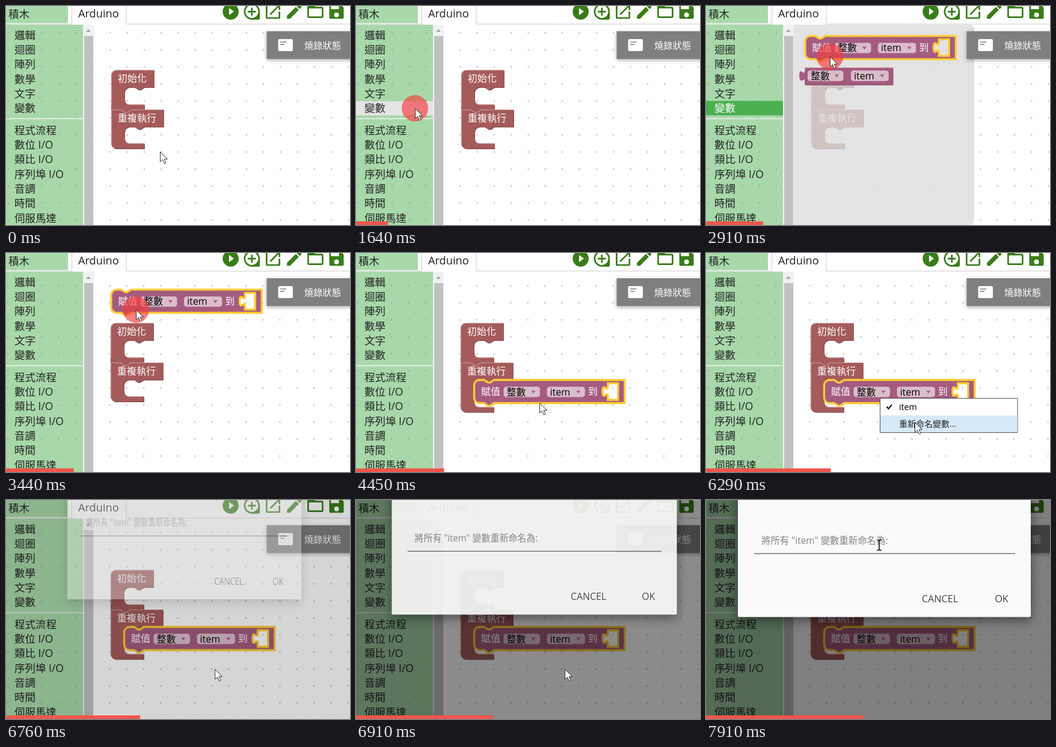
Write an HTML page that moves like this. It is 572x364 px and loops after 7.99 s.

```html
<!DOCTYPE html>
<html lang="zh-Hant">
<head>
<meta charset="utf-8">
<title>Block editor</title>
<style>
html, body { margin: 0; width: 100%; height: 100%; overflow: hidden; background: #fff; }
svg { display: block; width: 572px; height: 364px; }
text { font-family: "Open Sans", "Noto Sans CJK TC", "Noto Sans CJK", sans-serif; font-weight: 300; white-space: pre; }
.latin { font-weight: 400; }
.shade { filter: drop-shadow(0 2px 3px rgba(0, 0, 0, .35)); }
</style>
</head>
<body>
<svg id="stage" viewBox="0 0 572 364"></svg>
<script>
const LOOP = 7990;
const UNIT = 1.1;
const RED = '#a55b5b', PLUM = '#a55b80', GREEN = '#a8d9aa', DARK_GREEN = '#387c18';
const SHIFT = [-1, 10];

// Moments of the story, in ms
const T = { flyout: 1705, grab: 2540, drag: 2990, drop: 4080, menu: 5180, pick: 6640, dialog: 6717 };
const PRESSES = [[1540, 1760], [T.grab, T.drop], [4960, 5190], [6450, 6650]];

// Pointer stops: time, x, y
const POINTER = [
  [450, 256, 242], [1400, 98, 170], [1850, 98, 170], [2450, 206, 84], [T.drag, 206, 84],
  [3440, 216, 94], [3950, 249, 256], [T.drop, 249, 256], [4350, 305, 249], [4480, 305, 249],
  [4900, 360, 234], [5230, 360, 234], [5750, 347, 281], [7000, 347, 281], [7650, 290, 76], [7900, 288, 75]
];

// ---- drawing helpers -------------------------------------------------
const rect = (x, y, w, h, fill, more = '') =>
  `<rect x="${x}" y="${y}" width="${w}" height="${h}" fill="${fill}" ${more}/>`;
const path = (d, fill, more = '') => `<path d="${d}" fill="${fill}" ${more}/>`;
const group = (id, body, more = '') => `<g id="${id}" ${more}>${body}</g>`;
const at = (x, y, s = 1) => `translate(${x} ${y}) scale(${s})`;
// y is the visual middle of the line; Latin runs are set heavier than Chinese
const label = (x, y, str, size, fill = '#222', more = '') =>
  `<text x="${x}" y="${y + size * .38}" font-size="${size}" fill="${fill}" ${more}>` +
  str.replace(/[ -~]+/g, '<tspan class="latin">$&</tspan>') + '</text>';

// ---- blocks, in block units -------------------------------------------
const NOTCH = 'H15l6,4 3,0 6,-4';
const TAB_OUT = 'H30l-6,4 -3,0 -6,-4';
const SOCKET = 'v5c0,10 -8,-8 -8,7.5s8,-2.5 8,7.5';

function shape(d, color, shadow, lit) {
  return path(d, shadow, 'fill-rule="evenodd" transform="translate(1 1)"') +
    path(d, color, 'fill-rule="evenodd"') +
    path(lit, 'none', 'stroke="#fff" stroke-opacity=".4" stroke-width="1"');
}

function loopBlock(name, width, cavity, first) {
  const low = 26 + cavity, end = low + 8;
  const top = first ? 'M0,8a8,8 0 0,1 8,-8' : 'M0,0' + NOTCH;
  const foot = first ? TAB_OUT + 'H0Z' : 'H8a8,8 0 0,1 -8,-8Z';
  const d = `${top}H${width}V26H50l-6,4 -3,0 -6,-4h-7a8,8 0 0,0 -8,8V${low - 8}a8,8 0 0,0 8,8H50V${end}${foot}`;
  const lit = `M.5,${end - 7}V${first ? '8a7.5,7.5 0 0,1 7.5,-7.5' : '.5' + NOTCH}H${width - .5}M22,${low - 3}a8,8 0 0,0 6,3.5H49.5`;
  return shape(d, RED, '#844949', lit) + label(10, 12.2, name, 14.6, '#fff');
}

const field = (x, y, w, h, str) =>
  rect(x, y, w, h, '#fff', 'fill-opacity=".6" rx="4"') + label(x + 4.5, y + h / 2 - .3, str, 14.6, '#000') +
  path(`M${x + w - 13},${y + h / 2 - 2}h6l-3,4.5z`, PLUM);

const SET_PATH = `M0,8a8,8 0 0,1 8,-8${NOTCH}H227.5V35${TAB_OUT}H8a8,8 0 0,1 -8,-8Z` +
  'M202,5H217.5V30H202V25c0,-10 -8,8 -8,-7.5s8,2.5 8,-7.5Z';

const setBlock = () =>
  shape(SET_PATH, PLUM, '#844966', `M.5,27V8a7.5,7.5 0 0,1 7.5,-7.5${NOTCH}H227`) +
  label(10.5, 17.5, '賦值', 14.6, '#fff') + field(44.5, 10.3, 55, 15.5, '整數') +
  field(110, 10.3, 57.5, 15.5, 'item') + label(172, 17.5, '到', 14.6, '#fff') +
  path(SET_PATH, 'none', 'id="glow" stroke="#fc3" stroke-width="3"');

const getBlock = () =>
  shape(`M0,0H133V26H0V20c0,-10 -8,8 -8,-7.5s8,2.5 8,-7.5Z`, PLUM, '#844966', 'M.5,5V.5H132.5') +
  field(4.5, 4.7, 54, 16, '整數') + field(70, 4.7, 57, 16, 'item');

// ---- interface ------------------------------------------------------
const ROWS = ['邏輯', '迴圈', '陣列', '數學', '文字', '變數', '程式流程', '數位 I/O', '類比 I/O', '序列埠 I/O', '音調', '時間', '伺服馬達'];
const VARIABLES = 5;
const rowY = i => 48 + 24.35 * i + (i > VARIABLES ? 11.8 : 0);

const ICONS = [
  'M12 2a10 10 0 1 0 0 20a10 10 0 0 0 0-20zM10 16.5v-9l6 4.5z',
  'M12 2a10 10 0 1 0 0 20h8a2 2 0 0 0 2-2v-8A10 10 0 0 0 12 2zM12 4a8 8 0 1 1 0 16a8 8 0 0 1 0-16zM11 7h2v4h4v2h-4v4h-2v-4H7v-2h4z',
  'M19 19H5V5h7V3H5a2 2 0 0 0-2 2v14a2 2 0 0 0 2 2h14a2 2 0 0 0 2-2v-7h-2zM14 3v2h3.6L7.8 14.8l1.4 1.4L19 6.4V10h2V3z',
  'M3 17.25V21h3.75L17.8 9.94l-3.75-3.75zM20.7 7a1 1 0 0 0 0-1.4l-2.3-2.3a1 1 0 0 0-1.4 0l-1.9 1.8 3.8 3.8z',
  'M20 6h-8l-2-2H4a2 2 0 0 0-2 2v12a2 2 0 0 0 2 2h16a2 2 0 0 0 2-2V8a2 2 0 0 0-2-2zM20 18H4V8h16z',
  'M17 3H5a2 2 0 0 0-2 2v14a2 2 0 0 0 2 2h14a2 2 0 0 0 2-2V7zM12 19a3 3 0 1 1 0-6a3 3 0 0 1 0 6zM15 9H5V5h10z'
];

const header = () =>
  rect(0, 0, 572, 31, '#fff') + rect(0, 29.5, 572, 1, '#ccc') + rect(0, 0, 103, 28.5, GREEN) +
  label(4, 13, '積木', 17.5) +
  rect(109, 0, 1, 30, '#ccc') + rect(199.5, 0, 1, 30, '#ccc') + rect(110, 29, 89.5, 2, '#fff') +
  label(120, 12.5, 'Arduino', 18.2) +
  ICONS.map((d, i) => path(d, DARK_GREEN, `fill-rule="evenodd" transform="${at(357.6 + 35.2 * i, -6.7, 1.333)}"`)).join('');

const toolbox = () =>
  rect(0, 31, 128, 333, '#4caf50', 'opacity=".485"') +
  rect(0, 0, 128, 23.5, '#e4e4e4', 'id="hover"') +
  rect(0, rowY(VARIABLES) - 12, 128, 24, '#4caf50', 'id="selected"') +
  rect(0, 186.5, 128, 1.5, '#f1f6f1') +
  ROWS.map((s, i) => label(14, rowY(i), s, 17.5, '#222', i === VARIABLES ? 'id="varLabel"' : '')).join('') +
  rect(128, 31, 18, 333, '#f1f1f1') + rect(130, 50, 15, 314, '#c1c1c1') + path('M133,43l4,-4.5 4,4.5z', '#a3a3a3');

const status = () =>
  rect(433.5, 42, 145, 46, '#7f7f7f', 'class="shade"') +
  rect(452.5, 55, 24.5, 20, '#fff', 'rx="2.5"') + rect(456, 59, 10, 1.5, '#7f7f7f') + rect(456, 63, 7, 1.5, '#7f7f7f') +
  label(496, 65.5, '燒錄狀態', 15.3, '#fff');

const menu = () =>
  rect(289.5, 241.5, 228.5, 57, '#fff', 'stroke="#555"') +
  rect(290, 242, 227.5, 28, '#d6e9f8', 'id="choice"') +
  path('M300.5,255.5l3,3.5 5.5,-7', 'none', 'stroke="#000" stroke-width="2"') +
  label(321, 256, 'item', 14.2, '#000') + label(321, 284, '重新命名變數...', 14, '#222');

const dialog = () =>
  rect(53, -20, 487, 214.5, '#fafafa', 'rx="2" style="filter:drop-shadow(0 6px 9px rgba(0,0,0,.45))"') +
  label(92, 67, '將所有 "item" 變數重新命名為:', 15.4, '#858585') +
  rect(80, 88.5, 434, 1.2, '#555') +
  label(389, 164, 'CANCEL', 16.3, '#444', 'text-anchor="middle"') +
  label(491.5, 164, 'OK', 16.3, '#444', 'text-anchor="middle"');

const stage = document.getElementById('stage');
stage.innerHTML =
  `<defs><pattern id="grid" width="28.3" height="28.3" patternUnits="userSpaceOnUse" x="-11" y="1.6">
    ${rect(13.5, 13.5, 2.2, 2.2, '#bbb')}</pattern></defs>` +
  rect(0, 0, 572, 364, '#fff') +
  group('workspace',
    rect(-5, -20, 582, 420, 'url(#grid)') +
    group('setup', loopBlock('初始化', 64.5, 26, true), `transform="${at(174.8, 106.2, UNIT)}"`) +
    group('short', loopBlock('重複執行', 79, 25), `transform="${at(174.8, 172, UNIT)}"`) +
    group('tall', loopBlock('重複執行', 79, 41), `transform="${at(174.8, 172, UNIT)}"`)) +
  toolbox() + header() +
  group('flyout',
    path('M146,31H438a8,8 0 0,1 8,8V356a8,8 0 0,1 -8,8H146Z', '#ddd', 'opacity=".8"') +
    `<g transform="${at(164, 102, UNIT)}">${getBlock()}</g>`) +
  group('setter', setBlock()) + status() + group('menu', menu()) +
  rect(0, 0, 572, 364, '#000', 'id="dim"') + group('dialog', dialog()) +
  rect(0, 358, 0, 6, '#f0574a', 'id="bar"') +
  '<circle id="press" r="22" fill="#f43c3c" fill-opacity=".65"/>' +
  group('pointer',
    path('M.5,.5V17l4,-3.7 2.9,6.6 2.7,-1.2 -2.9,-6.3h5.3z', '#fff', 'id="arrow" stroke="#333" stroke-width="1"') +
    path('M-4,-8.5h3l1,1 1,-1h3M0,-7.5V7.5M-4,8.5h3l1,-1 1,1h3', 'none', 'id="beam" stroke="#111" stroke-width="1.6"'));

// ---- motion ---------------------------------------------------------
const el = {};
stage.querySelectorAll('[id]').forEach(n => el[n.id] = n);
const set = (id, attrs) => { for (const k in attrs) el[id].setAttribute(k, attrs[k]); };
const show = (id, on) => set(id, { display: on ? 'inline' : 'none' });
const within = (t, a, b) => t >= a && t < b;
const clamp = p => Math.min(1, Math.max(0, p));

function pointerAt(t) {
  let i = POINTER.findIndex(k => k[0] > t);
  if (i < 0) i = POINTER.length - 1;
  const b = POINTER[i], a = POINTER[Math.max(0, i - 1)];
  const p = clamp((t - a[0]) / (b[0] - a[0] || 1)), s = p * p * (3 - 2 * p);
  return [a[1] + (b[1] - a[1]) * s, a[2] + (b[2] - a[2]) * s];
}

function setterAt(t, x, y) {
  if (t < T.drag) return [165, 49.8];
  if (t < T.drop) return [x - 41, y - 33.2];
  return [196.5, 211];
}

function render(t) {
  const [x, y] = pointerAt(t);
  const flyout = within(t, T.flyout, T.drag), dropped = t >= T.drop;

  set('workspace', { transform: t >= T.drag ? at(...SHIFT) : at(0, 0) });
  show('short', !dropped);
  show('tall', dropped);
  show('flyout', flyout);
  show('selected', flyout);
  set('varLabel', { fill: flyout ? '#fff' : '#222' });

  const row = x < 128 ? ROWS.findIndex((_, i) => Math.abs(y - rowY(i)) < 12) : -1;
  show('hover', row >= 0 && !(flyout && row === VARIABLES));
  if (row >= 0) set('hover', { y: rowY(row) - 11.5 });

  show('setter', t >= T.flyout);
  set('setter', { transform: at(...setterAt(t, x, y), UNIT) });
  show('glow', t >= T.grab);

  show('menu', within(t, T.menu, T.pick));
  show('choice', y > 242);
  set('choice', { y: y > 270 ? 270 : 242 });

  const left = (1 - clamp((t - T.dialog) / 350)) ** 3, open = 1 - left;
  set('dim', { opacity: .5 * open });
  show('dialog', open > 0);
  set('dialog', {
    opacity: open,
    transform: `translate(296.5 ${-44 * left}) scale(${1 - .3 * left} 1) translate(-296.5 0)`
  });

  set('bar', { width: Math.max(0, .0332 * t - 1.4) });
  show('press', PRESSES.some(([a, b]) => within(t, a, b)));
  set('press', { cx: x, cy: y });
  const typing = t > T.dialog && y < 100;
  show('arrow', !typing);
  show('beam', typing);
  set('pointer', { transform: at(x, y) });
}

const start = performance.now();
function tick() {
  render((performance.now() - start) % LOOP);
  requestAnimationFrame(tick);
}
tick();
</script>
</body>
</html>
```
